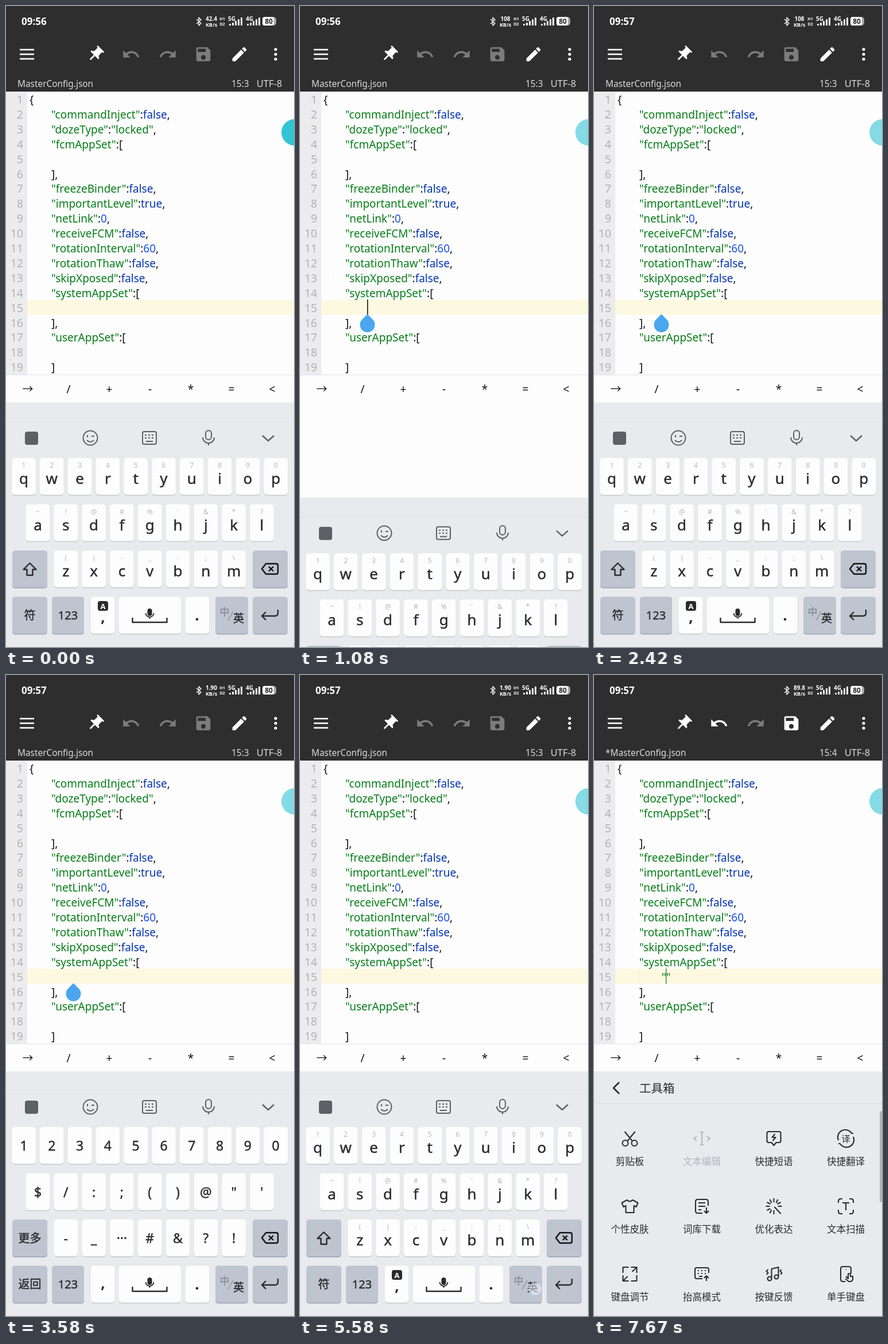
An HTML page with a canvas that plays this animation: 502x1116 px, repeating every 8 s.

```html
<!DOCTYPE html>
<html lang="zh">
<head>
<meta charset="utf-8">
<title>Editing a JSON file</title>
<style>
html, body { margin: 0; height: 100%; overflow: hidden; background: #fdfdfd; }
canvas { display: block; }
</style>
</head>
<body>
<canvas id="stage" width="502" height="1116"></canvas>
<script>
const g = document.getElementById('stage').getContext('2d');
const LOOP = 8000, FONT = '"Noto Sans", "Noto Sans CJK SC", "Noto Sans CJK", "DejaVu Sans", sans-serif';
const WHITE = '#fdfdfd', DIM = '#7c7c7c', INK = '#2b2b2d', GRAY = '#5d6064';
let t = 0;

// Touches: x, y, start, end
const taps = [
  [457, 752, 80, 250], [130, 526, 920, 1080], [41, 1066, 3080, 3330],
  [41, 1066, 4080, 4330], [410, 1069, 4580, 5000], [410, 1069, 5330, 5750],
  [41, 1066, 6250, 6480], [403, 926, 6480, 6750], [44, 754, 7250, 7500]
];

const pages = {
  en: [['qwertyuiop', '1234567890'], ['asdfghjkl', "~!@#%'&*?"], ['zxcvbnm', '()-_:;\\']],
  zh: [['QWERTYUIOP', '1234567890'], ['ASDFGHJKL', '~!@#%“”*?'], ['ZXCVBNM', '()-_:;/']],
  sym: [['1234567890'], ['$/:;()@"\''], ['-_…#&?!']]
};

const code = ['{', '"commandInject":false,', '"dozeType":"locked",', '"fcmAppSet":[', '', '],',
  '"freezeBinder":false,', '"importantLevel":true,', '"netLink":0,', '"receiveFCM":false,',
  '"rotationInterval":60,', '"rotationThaw":false,', '"skipXposed":false,', '"systemAppSet":[',
  '', '],', '"userAppSet":[', '', ']', '}'];

const icons = {
  undo: 'M12.5 8c-2.65 0-5.05.99-6.9 2.6L2 7v9h9l-3.62-3.62c1.39-1.16 3.16-1.88 5.12-1.88 3.54 0 6.55 2.31 7.6 5.5l2.37-.78C21.08 11.03 17.15 8 12.5 8z',
  save: 'M17 3H5c-1.11 0-2 .9-2 2v14c0 1.1.89 2 2 2h14c1.1 0 2-.9 2-2V7l-4-4zm-5 16c-1.66 0-3-1.34-3-3s1.34-3 3-3 3 1.34 3 3-1.34 3-3 3zm3-10H5V5h10v4z',
  edit: 'M3 17.25V21h3.75L17.81 9.94l-3.75-3.75L3 17.25zM20.71 7.04c.39-.39.39-1.02 0-1.41l-2.34-2.34c-.39-.39-1.02-.39-1.41 0l-1.83 1.83 3.75 3.75 1.83-1.83z',
  pin: 'M16 9V4h1c.55 0 1-.45 1-1s-.45-1-1-1H7c-.55 0-1 .45-1 1s.45 1 1 1h1v5c0 1.66-1.34 3-3 3v2h5.97v7l1 1 1-1v-7H19v-2c-1.66 0-3-1.34-3-3z'
};
const caret = 'M-3-11h6M-3 11h6M0-11v22M-9-4l-5 4 5 4M9-4l5 4-5 4';
const box = 'M-9-11h18q3 0 3 3v16q0 3-3 3h-18q-3 0-3-3v-16q0-3 3-3z';

const tools = [
  ['剪贴板', 'M-4 4L9-12M4 4L-9-12M-3 8a5 5 0 1 1-10 0a5 5 0 1 1 10 0M13 8a5 5 0 1 1-10 0a5 5 0 1 1 10 0'],
  ['文本编辑', caret],
  ['快捷短语', 'M-9-12h18q3 0 3 3v13q0 3-3 3h-5l-4 5-4-5h-5q-3 0-3-3v-13q0-3 3-3zM2-8l-5 6h6l-5 6'],
  ['快捷翻译', 'M-13 3A13 13 0 0 1 10-9l3 0M13-3A13 13 0 0 1-10 9l-3 0'],
  ['个性皮肤', 'M-5-11q5 5 10 0l9 5-3 7-4-2v12h-14v-12l-4 2-3-7z'],
  ['词库下载', 'M11-1v-7q0-4-4-4h-14q-4 0-4 4v16q0 4 4 4h8M-6-6h12M-6 0h12M-6 6h5M8 2v10M4 8l4 4 4-4'],
  ['优化表达', 'M0-14v7M-7-12l3 6M7-12l-3 6M-12-7l6 3M12-7l-6 3M-14 0h7M14 0h-7M-12 7l6-3M-7 12l3-6M0 14v-7M1 1l11 12'],
  ['文本扫描', 'M-13-6v-3q0-4 4-4h3M6-13h3q4 0 4 4v3M13 6v3q0 4-4 4h-3M-6 13h-3q-4 0-4-4v-3M-6-6h12M0-6v13'],
  ['键盘调节', 'M-12-2v-10h10M2-12h10v10M12 2v10h-10M-2 12h-10v-10M4-4l8-8M-4 4l-8 8'],
  ['抬高模式', 'M12-2v-6q0-3-3-3h-18q-3 0-3 3v13q0 3 3 3h10M-7-6h2M-1-6h2M5-6h2M-7-1h2M-1-1h2M5-1h2M-5 4h6M8 12v-9M4 7l4-4 4 4'],
  ['按键反馈', 'M-4 8v-17l12-3v17M-4 8a3.5 3.5 0 1 1-7 0a3.5 3.5 0 1 1 7 0M8 5a3.5 3.5 0 1 1-7 0a3.5 3.5 0 1 1 7 0M-10-8l-3 3 3 3-3 3M13-8l-2 3 3 3-2 3'],
  ['单手键盘', 'M9-1v-8q0-4-4-4h-10q-4 0-4 4v18q0 4 4 4h4M0-8h1M0 4l4 4v-8q2-2 4 0v4h4v6l-3 3h-4l-6-5']
];

const ramp = (a, b) => Math.min(1, Math.max(0, (t - a) / (b - a)));

function text(s, x, y, size, color, align = 'center', weight = 400) {
  g.font = `${weight} ${size}px ${FONT}`;
  g.fillStyle = color;
  g.textAlign = align;
  g.fillText(s, x, y);
}
// Key label, a touch heavier than regular
function label(s, x, y, size, color = INK) {
  text(s, x, y, size, color);
  g.strokeStyle = color;
  g.lineWidth = 0.45;
  g.strokeText(s, x, y);
}
function rect(x, y, w, h, color, r = 0) {
  g.fillStyle = color;
  g.beginPath();
  g.roundRect(x, y, w, h, r);
  g.fill();
}
function dot(x, y, r, color) {
  g.fillStyle = color;
  g.beginPath();
  g.arc(x, y, r, 0, 7);
  g.fill();
}
function line(d, x, y, color, width = 2) {
  g.save();
  g.translate(x, y);
  g.strokeStyle = color;
  g.lineWidth = width;
  g.lineJoin = 'round';
  g.stroke(new Path2D(d));
  g.restore();
}
function icon(name, x, color, flip = 1, turn = 0) {
  g.save();
  g.translate(x, 84);
  g.rotate(turn);
  g.scale(1.37 * flip, 1.37);
  g.translate(-12, -12);
  g.fillStyle = color;
  g.fill(new Path2D(icons[name]));
  g.restore();
}
function dots(x, y, gap, color) {
  for (const i of [-1, 0, 1]) dot(x, y + i * gap, 2.6, color);
}
function mic(x, y, color, solid) {
  if (solid) {
    rect(x - 4, y - 9, 8, 13, color, 4);
    line('M-7-1a7 7 0 0 0 14 0M0 6v3', x, y, color, 1.8);
  } else {
    line('M-5-7a5 5 0 0 1 10 0v6a5 5 0 0 1-10 0zM-10 0a10 10 0 0 0 20 0M0 10v4', x, y, color);
  }
}

function header(typed) {
  rect(0, 0, 502, 149, '#2e2e2e');
  text(t < 1830 ? '09:56' : '09:57', 27, 33, 17, '#fff', 'left', 600);
  line('M-4-4L4 3 0 7V-7L4-3-4 4', 336, 27, '#fff', 1.4);
  const speed = t < 420 ? '42.4' : t < 3420 ? '108' : t < 6420 ? '1.90' : '89.8';
  text(speed, 358, 26, 10, '#fff', 'center', 600);
  text('KB/s', 358, 36, 9, '#fff', 'center', 600);
  text('H1', 377, 25, 7, '#fff', 'center', 600);
  text('D2', 377, 34, 7, '#fff', 'center', 600);
  for (const [x, net] of [[388, '5G'], [419, '4G']]) {
    text(net, x - 1, 26, 10, '#fff', 'left', 600);
    [3, 5, 8, 11, 14].forEach((h, i) => rect(x + 1 + i * 5, 34 - h, 3, h, '#fff', 1));
  }
  rect(447, 19, 24, 15, '#a8a8a8', 5);
  rect(447, 19, 20, 15, '#fff', 4);
  text('80', 458, 31, 12, '#222', 'center', 700);

  for (const y of [76, 84, 92]) rect(24, y - 1.3, 25, 2.6, '#fff');
  icon('pin', 156, '#fff', 1, Math.PI / 4);
  icon('undo', 218, typed ? '#fff' : DIM);
  icon('undo', 282, DIM, -1);
  icon('save', 344, typed ? '#fff' : DIM);
  icon('edit', 407, '#fff');
  dots(470, 84, 8.5, '#fff');
  text((typed ? '*' : '') + 'MasterConfig.json', 20, 141, 15.4, '#dcdcdc', 'left');
  text(typed ? '15:4' : '15:3', 393, 141, 15.4, '#dcdcdc', 'left');
  text('UTF-8', 459, 141, 16.5, '#dcdcdc');
}

function codeLine(s, x, y) {
  for (const part of s.match(/"[^"]*"|[a-z]+|\d+|[^\w"]+/g) || []) {
    const color = part[0] === '"' ? '#067d17' : /[a-z]/.test(part) ? '#0033b3' : /\d/.test(part) ? '#1750eb' : '#111';
    text(part, x, y, 19, color, 'left');
    x += g.measureText(part).width;
  }
}

function editor(typed) {
  rect(0, 149, 502, 967, WHITE);
  rect(0, 149, 37, 967, '#ececee');
  rect(37, 511.5, 465, 26, '#fdf8e0');
  code.forEach((s, i) => {
    const y = 170 + i * 25.9;
    text(i + 1, 30, y, 19.5, '#b2b2b4', 'right');
    codeLine(s, i % 19 ? 79 : 41, y);
  });
  // The caret blinks every 500 ms after the last edit
  const since = t - (typed ? 6500 : 920);
  const lit = since >= 0 && Math.floor(since / 500) % 2 === 0;
  if (typed) {
    rect(79, 512, 1, 25, '#f2ecd6');
    if (lit) rect(125, 511, 1.3, 27, '#2f7a45');
    codeLine('""', 118, 532.6);
  } else if (lit) {
    rect(117, 511, 1.6, 27, '#111');
  }
  if (t >= 1000 && t < 4420) {
    g.fillStyle = '#4ba6ee';
    g.fill(new Path2D('M117.5 536.6l9.2 9.2a13 13 0 1 1-18.4 0z'));
  }
}

function popup() {
  g.globalAlpha = ramp(1080, 1240) * (1 - ramp(1420, 1600));
  if (g.globalAlpha) {
    g.save();
    g.shadowColor = 'rgba(0,0,0,.28)';
    g.shadowBlur = 5;
    g.shadowOffsetY = 1;
    rect(22, 437, 252, 64, 'rgba(250,250,251,.87)', 32);
    g.restore();
    line(caret, 59, 469, INK, 2.2);
    rect(112, 463, 13, 13, INK);
    g.setLineDash([2.6, 2.6]);
    line('M-11-11h22v22h-22z', 118.5, 469.5, INK, 2.6);
    g.setLineDash([]);
    line('M-11-11h22v23h-22z', 181, 469, INK, 2.6);
    rect(174, 456, 14, 7, INK, 2);
    dots(244, 469, 9, INK);
  }
  g.globalAlpha = 1;
}

function symbolBar(y) {
  rect(0, y, 502, 1116 - y, WHITE);
  rect(0, y - 0.5, 502, 1.2, '#e6e6f2');
  ['→', '/', '+', '-', '*', '=', '<'].forEach((s, i) => text(s, 38 + i * 71, y + 32, 19, '#111'));
}

function key(x, y, w, dark) {
  const down = dark && taps.some(([a, b, s, e]) =>
    t >= s && t < e - 170 && a > x && a < x + w && b > y && b < y + 64);
  rect(x, y + 1, w, 65, dark ? '#a9afbb' : '#cfd1d5', 5);
  rect(x, y, w, 64, down ? '#858b91' : dark ? '#bec4d0' : WHITE, 5);
}

function keyboard(page) {
  const sym = page === 'sym', zh = page === 'zh';
  rect(0, 690, 502, 426, '#e8eaed');
  rect(0, 723, 502, 1, '#e1e3ea');
  rect(33, 741, 23, 23, GRAY, 4);
  line('M12.5 0a12.5 12.5 0 1 1-25 0a12.5 12.5 0 1 1 25 0M-6 4q6 6 12 0M2-3h5M-5-5v4', 147, 752, GRAY);
  line(box + 'M-8-5h3M-2-5h3M4-5h3M-8 0h3M-2 0h3M4 0h3M-6 6h12', 250, 752, GRAY);
  mic(353, 751, GRAY);
  line('M-10-4l10 9 10-9', 457, 752, GRAY, 2.4);

  pages[page].forEach(([chars, hints], r) => {
    const y = 787 + r * 80.5;
    [...chars].forEach((c, i) => {
      const x = [31, 55.5, 104.3][r] + i * 48.8;
      key(x - 20.8, y, 41.6);
      if (sym) label(c === '…' ? '···' : c, x, y + 41, 23);
      else {
        text(hints[i], x, y + 17, 12, '#b7b7ba');
        label(c, x, y + 45, zh ? 24.5 : 26);
      }
    });
  });

  key(11, 948, 61, true);
  if (sym) label('更多', 41.5, 987.5, 20);
  else line('M0-11l11 11h-6v10h-10v-10h-6z', 41.5, 981, INK, 2.4);
  key(430, 948, 61, true);
  line('M-14 0l7-9h18q3 0 3 3v12q0 3-3 3h-18zM-2-4l8 8M6-4l-8 8', 460, 980, '#111', 2.4);

  const y = 1028.5;
  key(11, y, 61, true);
  label(sym ? '返回' : '符', 41.5, 1068, 20);
  key(80, y, 56, true);
  label('123', 108, 1068, 20);
  key(148, y, 41.5);
  if (page === 'en') {
    rect(160, 1036, 18, 17, INK, 4);
    text('A', 169, 1050, 13, '#fff', 'center', 700);
  }
  key(197, y, 108);
  mic(250.5, 1058, INK, true);
  line('M-30-8v8h60v-8', 250.5, 1073, INK, 2.4);
  key(312.5, y, 41.5);
  if (zh) {
    label('，', 174, 1068, 19);
    label('。', 339, 1070, 19);
  } else {
    text(',', 169, sym ? 1068 : 1073, 26, INK, 'center', 600);
    text('.', 333, 1070, 26, INK, 'center', 600);
  }
  key(365, y, 57, true);
  label('中', 381, zh ? 1063 : 1061, zh ? 19 : 17, zh ? INK : '#878d98');
  line('M5-8L-4 8', 391, 1062, '#878d98', 1.2);
  label('英', 405.5, 1073, zh ? 17 : 19, zh ? '#878d98' : INK);
  key(430, y, 61, true);
  line('M14-10v6q0 5-5 5h-22M-7-6l-7 7 7 7', 460, 1061, INK, 2.4);
}

function toolbox() {
  rect(0, 690, 502, 426, '#e8eaee');
  line('M5-10l-10 10 10 10', 39, 719, INK, 2.8);
  text('工具箱', 79, 726.5, 20.5, INK, 'left');
  rect(0, 745.5, 502, 1, '#dadde2');
  tools.forEach(([name, d], i) => {
    const x = 62.5 + (i % 4) * 125.5, y = 807 + Math.floor(i / 4) * 118;
    const color = i === 1 ? '#b1b5bd' : INK;
    line(d, x, y, color, 2.1);
    if (i === 3) text('译', x, y + 6, 15, color);
    text(name, x, y + 46, 16.5, color);
  });
  rect(498, 759, 4, 159, '#b3b5b9', 2);
}

function touches() {
  for (const [x, y, start, end] of taps) {
    if (t < start || t >= end) continue;
    g.globalAlpha = 1 - ramp(end - 170, end);
    dot(x, y, 11, 'rgba(240,245,252,.55)');
    line('M11 0a11 11 0 1 1-22 0a11 11 0 1 1 22 0', x, y, 'rgba(175,203,240,.75)', 1.2);
  }
  g.globalAlpha = 1;
}

function draw() {
  const typed = t >= 6500;
  const page = t < 3170 ? 'en' : t < 4170 ? 'sym' : t < 4620 ? 'en' : t < 5420 ? 'zh' : t < 6330 ? 'en' : 'sym';
  const slide = t < 920 ? ramp(200, 500) ** 2 : (1 - ramp(1000, 1300)) ** 3;

  editor(typed);
  header(typed);
  g.globalAlpha = 1 - 0.4 * ramp(500, 830);
  dot(503, 220, 23, '#35c3d6');
  g.globalAlpha = 1;
  symbolBar(t >= 200 && t < 1000 ? 1068 : 642);
  popup();

  g.save();
  g.translate(0, 426 * slide);
  keyboard(page);
  g.globalAlpha = ramp(7400, 7560);
  if (t > 7400) toolbox();
  g.restore();
  touches();
}

function frame(now) {
  t = now % LOOP;
  draw();
  requestAnimationFrame(frame);
}
requestAnimationFrame(frame);
</script>
</body>
</html>
```
